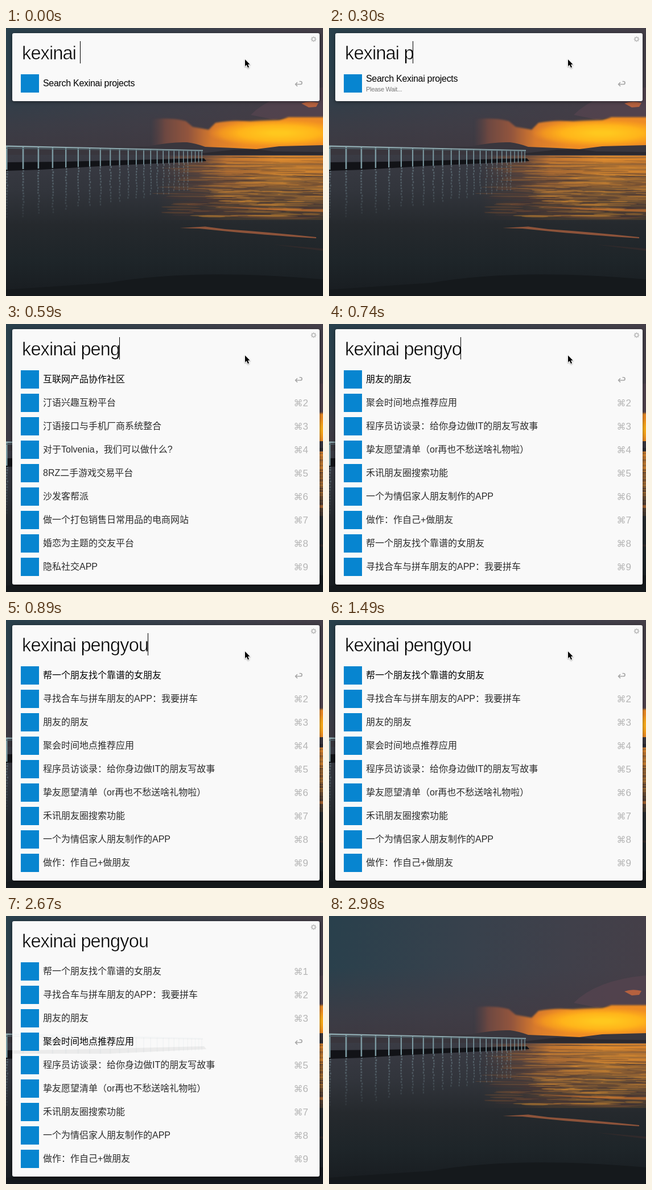
Write an HTML page with a canvas that moves like this. It is 557 px wide and 469 px high and loops after 3050 ms.

```html
<!DOCTYPE html>
<html lang="zh-CN">
<head>
<meta charset="utf-8">
<title>Launcher search</title>
<style>
html, body { margin: 0; width: 100%; height: 100%; overflow: hidden; background: #1c2227; }
canvas { display: block; }
</style>
</head>
<body>
<canvas id="stage" width="557" height="469"></canvas>
<script>
const W = 557, H = 469, LOOP = 3050, TAU = Math.PI * 2;
const PANEL = '#f9f9f9', BLUE = '#0785d0';
const SANS = '"Liberation Sans", "Noto Sans CJK SC", "Noto Sans CJK JP", sans-serif';
const stage = document.getElementById('stage');
const ctx = stage.getContext('2d');

const COMMUNITY = ['互联网产品协作社区', '汀语兴趣互粉平台', '汀语接口与手机厂商系统整合',
  '对于Tolvenia，我们可以做什么?', '8RZ二手游戏交易平台', '沙发客帮派',
  '做一个打包销售日常用品的电商网站', '婚恋为主题的交友平台', '隐私社交APP'];
const FRIENDS = ['帮一个朋友找个靠谱的女朋友', '寻找合车与拼车朋友的APP：我要拼车', '朋友的朋友',
  '聚会时间地点推荐应用', '程序员访谈录：给你身边做IT的朋友写故事', '挚友愿望清单（or再也不愁送啥礼物啦）',
  '禾讯朋友圈搜索功能', '一个为情侣家人朋友制作的APP', '做作：作自己+做朋友'];
const SHUFFLED = [...FRIENDS.slice(2), ...FRIENDS.slice(0, 2)];

// Timelines: [start in ms, value]
const QUERY = [[0, ''], [300, 'p'], [440, 'pen'], [590, 'peng'], [740, 'pengyo'], [890, 'pengyou']];
const RESULTS = [[0, null], [590, COMMUNITY], [740, SHUFFLED], [890, FRIENDS]];
const CARET = [[0, true], [1490, false], [1940, true], [2530, false]];
const SELECTED = [[0, 0], [2230, 3]];
const POINTER = [[0, [420, 55]], [2080, [460, 123]], [2230, [503, 209]], [2530, [547, 425]], [2670, null]];
const at = (line, t) => line.filter(([start]) => start <= t).pop()[1];

let seed = 11;
const rand = () => (seed = seed * 16807 % 2147483647) / 2147483647;

function blend(gradient, ...stops) {
  stops.forEach(([pos, color]) => gradient.addColorStop(pos, color));
  return gradient;
}

function shape(g, color, d) {
  g.fillStyle = color;
  g.fill(new Path2D(d));
}

const postX = k => 420 - 419 * .931 ** k;

function pier(g) {
  shape(g, '#121317', 'M0 235L100 234L348 228L352 233L180 241L60 248L0 250Z');
  g.fillStyle = '#7c9aa2';
  for (let k = 0; k < 25; k++) {
    const x = postX(k), top = 207 + x * .023;
    g.fillRect(x - 1.2, top, 2.8 - x / 220, 41 - x * .06);
  }
  shape(g, '#8fabb1', 'M0 205.5L346 213.5V215L0 208Z');
  shape(g, '#50656d', 'M0 209.5L346 215V216L0 211Z');
}

function paintSky(g) {
  g.fillStyle = blend(g.createLinearGradient(0, 0, W, 90),
    [0, '#29404c'], [.45, '#38414c'], [.75, '#40404a'], [1, '#453f48']);
  g.fillRect(0, 0, W, 224);
  g.fillStyle = blend(g.createLinearGradient(0, 90, 0, 222),
    [0, '#43394200'], [.6, '#433a42a0'], [1, '#3d3840']);
  g.fillRect(0, 90, W, 134);
  shape(g, '#584550b0', 'M430 152Q470 112 557 104V156L496 156L470 160Z');
  shape(g, '#b5613f', 'M519 132Q532 127 549 131L545 138L532 139Z');

  // Sunset below the cloud edge
  g.save();
  g.filter = 'blur(1.5px)';
  shape(g, blend(g.createLinearGradient(255, 0, 420, 0),
    [0, '#5c424300'], [.15, '#6d4841'], [.4, '#93553d'], [.65, '#d87a2c'], [1, '#ee8c24']),
    'M250 160Q290 156 316 163L328 173L356 178L368 166Q400 160 430 164L480 162L496 156L560 156V222H250Z');
  g.translate(480, 184);
  g.scale(1, .2);
  g.fillStyle = blend(g.createRadialGradient(0, 0, 15, 0, 0, 125),
    [0, '#ffc81e'], [.5, '#ffb41a'], [.8, '#f99f1cb0'], [1, '#f0902400']);
  g.fillRect(-130, -130, 220, 260);
  g.restore();

  shape(g, '#39363d', 'M0 211L250 207Q290 199 318 200Q334 202 350 208L400 210L440 212L480 207L557 205V224H0Z');
  shape(g, '#2b292f', 'M345 219L400 213L440 212L470 216L557 217V223H345Z');
}

function paintWater(g) {
  g.fillStyle = blend(g.createLinearGradient(0, 222, 0, H),
    [0, '#3a3b44'], [.25, '#32353c'], [.5, '#25292d'], [.75, '#1e2529'], [1, '#181c20']);
  g.fillRect(0, 222, W, H - 222);

  // Warm reflection: one faint band per pixel row, rippling in strength
  g.fillStyle = blend(g.createLinearGradient(265, 0, W, 0),
    [0, '#a85c3000'], [.25, '#a85c3060'], [.42, '#d87c2ce0'], [.75, '#f2932a'], [1, '#e88a2a']);
  for (let y = 223; y < 336; y++) {
    const depth = (y - 223) / 113;
    const ripple = .8 + .2 * Math.sin(y * .9 + Math.sin(y * .31) * 3);
    g.globalAlpha = (.95 - depth * .75) * ripple;
    g.fillRect(265, y, W - 265, 1);
  }
  g.globalAlpha = 1;
  for (let i = 0; i < 260; i++) {
    const depth = rand(), y = 226 + depth * 104;
    const x = 300 + rand() * 270, length = 12 + rand() * 40;
    const dark = rand() < .35 + depth * .25;
    g.fillStyle = dark ? '#40323468' : x < 350 ? '#b4683038' : '#f09a3050';
    g.beginPath();
    g.ellipse(x, y, length, .5 + depth * 1.1, .01, 0, TAU);
    g.fill();
  }
  shape(g, '#c8702fa0', 'M315 308Q410 316 557 317V322Q440 319 315 308Z');
  shape(g, '#8a503670', 'M365 327Q460 333 557 331L520 334Q430 334 365 327Z');
  shape(g, '#8d533a', 'M305 350L350 347.5L385 352Q460 357 545 366V368Q450 362 380 355L340 351Z');
  shape(g, '#422e2c80', 'M470 379L557 386V390Z');
  shape(g, '#15191c', 'M180 446Q330 420 557 440V469H0V458Z');

  // Broken reflections of the posts
  for (let k = 0; k < 21; k++) {
    const x = postX(k), bottom = 334 - x * .16;
    for (let y = 249 - x * .04; y < bottom; y += 5) {
      g.fillStyle = `rgba(130,158,167,${.5 * (1 - (y - 236) / 110)})`;
      g.fillRect(x - 2 + rand() * 2, y, 3 - x / 250, 3.3);
    }
  }
}

function paintPhoto() {
  const photo = document.createElement('canvas');
  photo.width = W;
  photo.height = H;
  const g = photo.getContext('2d');
  paintSky(g);
  paintWater(g);
  pier(g);
  return photo;
}
const photo = paintPhoto();

function text(string, x, y, size, color, { spacing = 0, align = 'left', weight = 400, family = SANS } = {}) {
  ctx.font = `${weight} ${size}px ${family}`;
  ctx.letterSpacing = spacing + 'px';
  ctx.textAlign = align;
  ctx.fillStyle = color;
  ctx.fillText(string, x, y);
  return ctx.measureText(string).width;
}

function line(d, color, width) {
  ctx.strokeStyle = color;
  ctx.lineWidth = width;
  ctx.stroke(new Path2D(d));
}

function panel(height) {
  ctx.save();
  ctx.shadowColor = 'rgba(0,0,0,.5)';
  ctx.shadowBlur = 6;
  ctx.shadowOffsetY = 1;
  ctx.fillStyle = PANEL;
  ctx.beginPath();
  ctx.roundRect(11, 9, 540, height, 3);
  ctx.fill();
  ctx.restore();
}

function gear() {
  ctx.save();
  ctx.translate(540.5, 19.5);
  line('M3 0A3 3 0 1 1 -3 0A3 3 0 1 1 3 0', '#bdbdbd', 1.7);
  for (let i = 0; i < 8; i++) {
    ctx.rotate(TAU / 8);
    line('M3.3 0H4.8', '#bdbdbd', 1.6);
  }
  ctx.restore();
}

function query(word, caret) {
  const string = 'kexinai ' + word;
  const width = text(string, 28, 55, 32.5, '#000', { spacing: -.85 });
  // A fine outline in the panel colour gives a light weight
  ctx.lineJoin = 'round';
  ctx.strokeStyle = PANEL;
  ctx.lineWidth = .6;
  ctx.strokeText(string, 28, 55);
  if (caret) {
    ctx.fillStyle = '#000';
    ctx.fillRect(Math.floor(28 + width) - 1, 23, 1, 39);
  }
}

function shortcut(index, selected) {
  const y = 97 + index * 41;
  if (selected) {
    ctx.save();
    ctx.translate(0, y - 97);
    line('M515.5 93.5H517.5a2.5 2.5 0 0 1 0 5H509M512 95L508.5 98.5L512 102', '#a6a6a6', 1.7);
    ctx.restore();
  } else {
    text('⌘', 513.5, y + 6, 16, '#b4b4b4', { align: 'center', family: '"DejaVu Sans", sans-serif' });
    text(index + 1, 531, y + 6, 17, '#b4b4b4', { align: 'right' });
  }
}

function icon(index) {
  ctx.fillStyle = BLUE;
  ctx.fillRect(26, 81 + index * 41, 32, 32);
}

function ghost() {
  ctx.save();
  ctx.beginPath();
  ctx.rect(11, 200, 540, 41);
  ctx.clip();
  ctx.globalAlpha = .06;
  pier(ctx);
  ctx.restore();
}

function pointer(x, y) {
  ctx.save();
  ctx.translate(x, y);
  ctx.shadowColor = 'rgba(0,0,0,.35)';
  ctx.shadowBlur = 2;
  ctx.shadowOffsetY = 1;
  const arrow = 'M0 0V12L2.8 9.5L5 14.5L7 13.6L4.9 8.8H8.6Z';
  line(arrow, '#fff', 2);
  ctx.shadowColor = 'transparent';
  shape(ctx, '#000', arrow);
  ctx.restore();
}

function draw(t) {
  ctx.drawImage(photo, 0, 0);
  if (t >= 2980) return;

  const results = at(RESULTS, t), selected = at(SELECTED, t), tip = at(POINTER, t);
  panel(results ? 447 : 119);
  gear();
  query(at(QUERY, t), at(CARET, t));
  if (selected) ghost();

  if (results) {
    results.forEach((title, i) => {
      const active = i === selected;
      icon(i);
      text(title, 65, 102 + i * 41, 16, active ? '#000' : '#2b2b2b', { weight: active ? 400 : 300 });
      shortcut(i, active);
    });
  } else {
    const waiting = t >= 300;
    icon(0);
    text('Search Kexinai projects', 65, waiting ? 94 : 102, 16, '#000', { spacing: -.3 });
    if (waiting) text('Please Wait...', 65, 111, 11, '#777', { spacing: -.3 });
    shortcut(0, true);
  }
  if (tip) pointer(...tip);
}

const start = performance.now();
function tick() {
  draw((performance.now() - start) % LOOP);
  requestAnimationFrame(tick);
}
tick();
</script>
</body>
</html>
```
